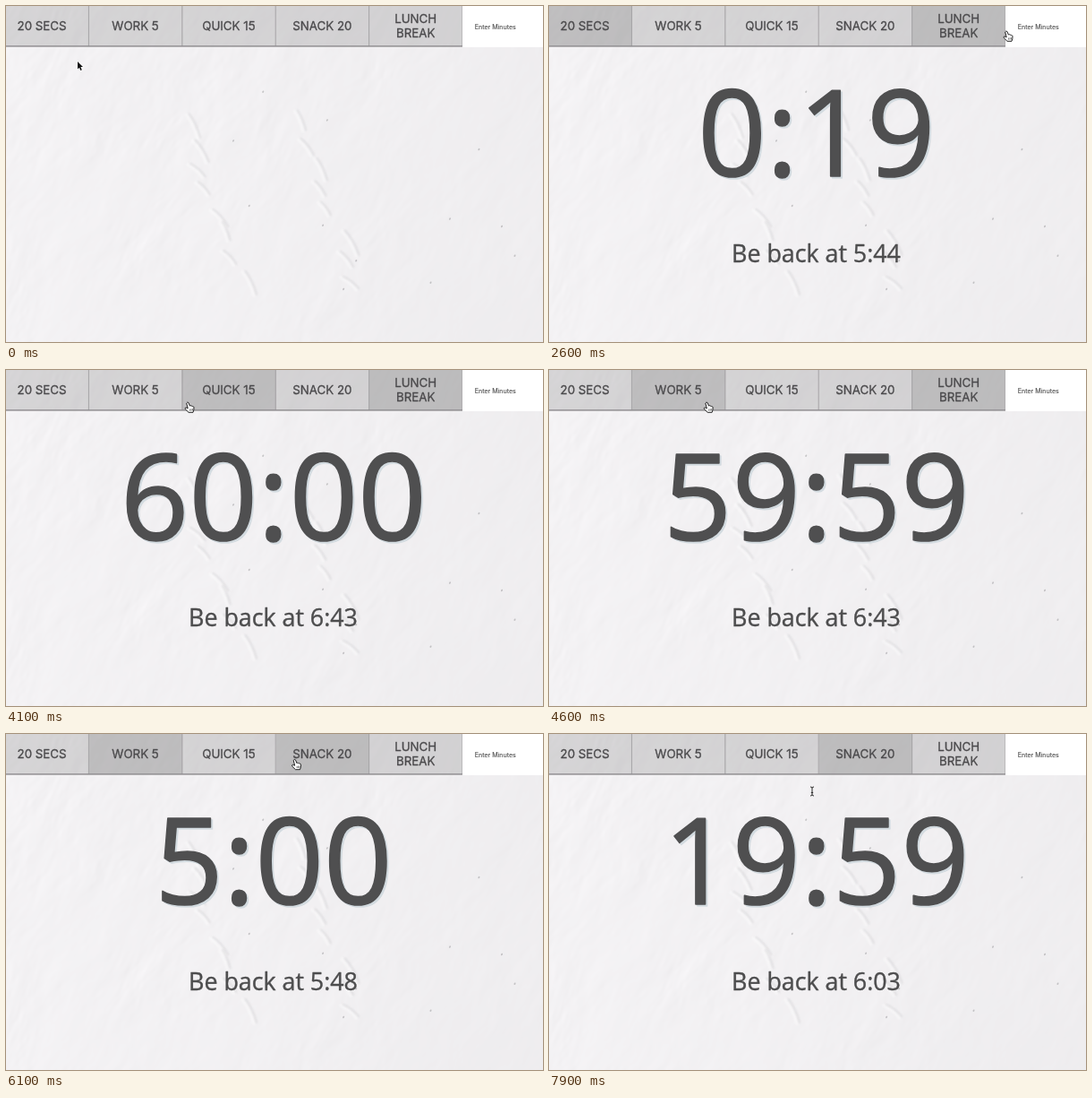
An HTML page with a canvas that plays this animation: 600x375 px, repeating every 8 s.

```html
<!DOCTYPE html>
<html lang="en">
<head>
<meta charset="utf-8">
<title>Break timer</title>
<style>
html, body { margin: 0; width: 100%; height: 100%; overflow: hidden; background: #f0eff1; }
canvas { display: block; width: 600px; height: 375px; }
</style>
</head>
<body>
<canvas id="stage" width="600" height="375"></canvas>
<script>
const W = 600, H = 375, LOOP = 8000, STEP = 100;
const ctx = document.getElementById('stage').getContext('2d');
ctx.lineJoin = 'round';

const NAV_H = 45, PITCH = 104.4, NAV_LEFT = -11.7;
const UI = 'Inter, Roboto, sans-serif';
const SANS = '"Open Sans", "Noto Sans", sans-serif';
const labels = ['20 SECS', 'WORK 5', 'QUICK 15', 'SNACK 20', 'LUNCH BREAK'];

// Timers: time shown, button, seconds to count
const runs = [
  { at: 800, button: 0, secs: 20 },
  { at: 3400, button: 4, secs: 3600 },
  { at: 5200, button: 1, secs: 300 },
  { at: 6700, button: 3, secs: 1200 }
];
const PRESS_LEAD = 100;                 // the button takes focus this long before
const CLOCK = (5 * 60 + 43) * 60 + 40;  // time of day at the loop start, in seconds

// Pointer moves: from, to, goal x, goal y
const START = [80, 62];
const moves = [
  [0, 300, 63, 31], [2000, 2600, 511, 28], [2600, 3100, 489, 28],
  [3600, 4100, 203, 36], [4100, 4700, 174, 36], [5500, 6300, 350, 27], [7400, 7900, 294, 64]
];

const smooth = f => f * f * (3 - 2 * f);
const mix = (a, b, p) => a + (b - a) * p;

function pointerAt(t) {
  let [x, y] = START;
  for (const [from, to, gx, gy] of moves) {
    const p = smooth(Math.min(1, Math.max(0, (t - from) / (to - from))));
    x = mix(x, gx, p);
    y = mix(y, gy, p);
  }
  return [x, y];
}

// ---- plaster wall ----
function hash(i, j) {
  const s = Math.sin(i * 127.1 + j * 311.7) * 43758.5453;
  return s - Math.floor(s);
}

function noise(x, y) {
  const i = Math.floor(x), j = Math.floor(y);
  const u = smooth(x - i), v = smooth(y - j);
  const top = mix(hash(i, j), hash(i + 1, j), u);
  const low = mix(hash(i, j + 1), hash(i + 1, j + 1), u);
  return mix(top, low, v);
}

// Steep, slanted streaks at three scales
function relief(x, y) {
  const u = x + y * 0.4 + 16 * noise(x / 40, y / 40);
  let h = 0;
  for (const size of [26, 11, 5]) h += size * 0.42 * noise(u / size, y / size / 1.7);
  return h;
}

function drawRidges(c) {
  const stroke = (x, y, dx, dy, color, width) => {
    c.strokeStyle = color;
    c.lineWidth = width;
    c.beginPath();
    c.moveTo(x, y);
    c.quadraticCurveTo(x + dx * 0.6, y + dy * 0.35, x + dx, y + dy);
    c.stroke();
  };
  c.lineCap = 'round';
  c.filter = 'blur(1.2px)';
  for (const left of [185, 312]) {
    for (let i = 0; i < 8; i++) {
      const r = hash(i, left), q = hash(left, i);
      const x = left + i * 9 + r * 22, y = 112 + i * 25 + q * 16;
      const dx = 6 + 12 * q, dy = 12 + 16 * r;
      stroke(x - 3, y + 1, dx, dy, 'rgba(255,255,255,.4)', 4);
      stroke(x, y, dx, dy, 'rgba(120,118,122,.16)', 1.8);
    }
  }
  c.filter = 'blur(.5px)';
  c.fillStyle = 'rgba(110,108,112,.35)';
  for (let i = 0; i < 12; i++) {
    c.beginPath();
    c.ellipse(230 + 360 * hash(i, 4), 60 + 300 * hash(i, 8), 0.9, 1.3, 0.5, 0, 7);
    c.fill();
  }
}

function makeWall() {
  const wall = document.createElement('canvas');
  wall.width = W;
  wall.height = H;
  const c = wall.getContext('2d');
  const img = c.createImageData(W, H);
  for (let y = 0, p = 0; y < H; y++) {
    for (let x = 0; x < W; x++, p += 4) {
      const rough = (1.05 - 0.65 * x / W) * (0.4 + 0.9 * noise(x / 70 + 3, y / 70));
      const tilt = relief(x + 1.2, y + 0.5) - relief(x - 1.2, y - 0.5);
      const v = 243 - 5 * x / W + 1.5 * noise(x / 120, y / 120) + tilt * rough * 1.5;
      img.data.set([v, v - 1.5, v + 0.5, 255], p);
    }
  }
  c.putImageData(img, 0, 0);
  drawRidges(c);
  return wall;
}
const wall = makeWall();

// ---- page ----
// The thin outline gives the slightly heavy look of smoothed type
function text(s, x, y, size, family, color, weight, align = 'center') {
  ctx.font = `${size}px ${family}`;
  ctx.textAlign = align;
  ctx.fillStyle = ctx.strokeStyle = color;
  ctx.lineWidth = weight;
  ctx.fillText(s, x, y);
  ctx.strokeText(s, x, y);
}

function drawNav(focus, hover) {
  labels.forEach((label, i) => {
    const x = NAV_LEFT + i * PITCH, left = Math.round(x), right = Math.round(x + PITCH);
    ctx.fillStyle = i === focus || i === hover ? 'rgba(105,105,105,.39)' : 'rgba(120,120,120,.25)';
    ctx.fillRect(left, 0, right - left, NAV_H);
    ctx.fillStyle = '#a5a3a6';
    ctx.fillRect(x + PITCH - 0.8, 0, 1, NAV_H);
    ctx.fillStyle = '#8d8b8e';
    ctx.fillRect(left, NAV_H - 0.8, right - left, 1.4);
    const lines = label.length > 8 ? label.split(' ') : [label];
    lines.forEach((line, n) => {
      const y = 27 + (n - (lines.length - 1) / 2) * 15.8;
      text(line, x + PITCH / 2 - 0.4, y, 13.3, UI, '#4a494b', 0.3);
    });
  });
  ctx.fillStyle = '#fff';
  ctx.fillRect(510, 0, 90, 46);
  text('Enter Minutes', 523.7, 25.5, 7.1, UI, '#555', 0.15, 'left');
}

const split60 = n => Math.floor(n / 60) + ':' + String(Math.floor(n % 60)).padStart(2, '0');

function drawTimer(run, t) {
  const clock = split60(run.secs - Math.floor((t - run.at) / 1000));
  const back = split60((CLOCK + run.at / 1000 + run.secs) / 60);
  text(clock, 300.9, 191.6, 134, SANS, '#d3dbe0', 1.6);
  text(clock, 298.9, 189.6, 134, SANS, '#4f4f50', 1.6);
  text('Be back at ' + back, 298.5, 285.7, 26.8, SANS, '#4d4d4e', 0.4);
}

// ---- pointers, drawn around their hotspot ----
const arrow = new Path2D('M0 0V8.4L1.9 6.7L3.3 9.9L4.8 9.3L3.4 6.1H6Z');
const hand = new Path2D('M-1.3 1Q-.4 -.7 1 .5L2.3 4Q3.4 3.2 4 4.2Q5 3.7 5.5 4.7' +
  'Q6.8 4.5 7 5.8L6.8 8.5L6 11.3H1L-2.7 7.7Q-3.5 6 -1.9 5.9L.2 6.8Z');
const knuckles = new Path2D('M2.6 7.5V9.6M4.1 7.3V9.6M5.5 7.3V9.4');
const beam = new Path2D('M-2 -5Q0 -5 0 -3.8Q0 -5 2 -5M0 -4V4M-2 5Q0 5 0 3.8Q0 5 2 5M-1.2 1.4H1.2');

function line(path, color, width) {
  ctx.strokeStyle = color;
  ctx.lineWidth = width;
  ctx.stroke(path);
}

function drawPointer(x, y, kind) {
  ctx.save();
  ctx.translate(x, y);
  if (kind === 'beam') {
    line(beam, 'rgba(255,255,255,.7)', 2.2);
    line(beam, '#222', 1);
  } else if (kind === 'hand') {
    ctx.fillStyle = '#fff';
    ctx.fill(hand);
    line(hand, '#222', 1);
    line(knuckles, '#222', 0.6);
  } else {
    line(arrow, '#fff', 1.4);
    ctx.fillStyle = '#111';
    ctx.fill(arrow);
  }
  ctx.restore();
}

function draw(t) {
  const [x, y] = pointerAt(t);
  const run = runs.filter(r => r.at <= t).pop();
  const focus = runs.filter(r => r.at - PRESS_LEAD <= t).pop();
  const inNav = y < NAV_H;
  const hover = inNav ? Math.min(4, Math.floor((x - NAV_LEFT) / PITCH)) : -1;
  ctx.drawImage(wall, 0, 0);
  drawNav(focus ? focus.button : -1, hover);
  if (run) drawTimer(run, t);
  drawPointer(x, y, inNav ? 'hand' : run ? 'beam' : 'arrow');
}

const begin = performance.now();
function frame() {
  const t = (performance.now() - begin) % LOOP;
  draw(Math.floor(t / STEP) * STEP);
  requestAnimationFrame(frame);
}
frame();
</script>
</body>
</html>
```
